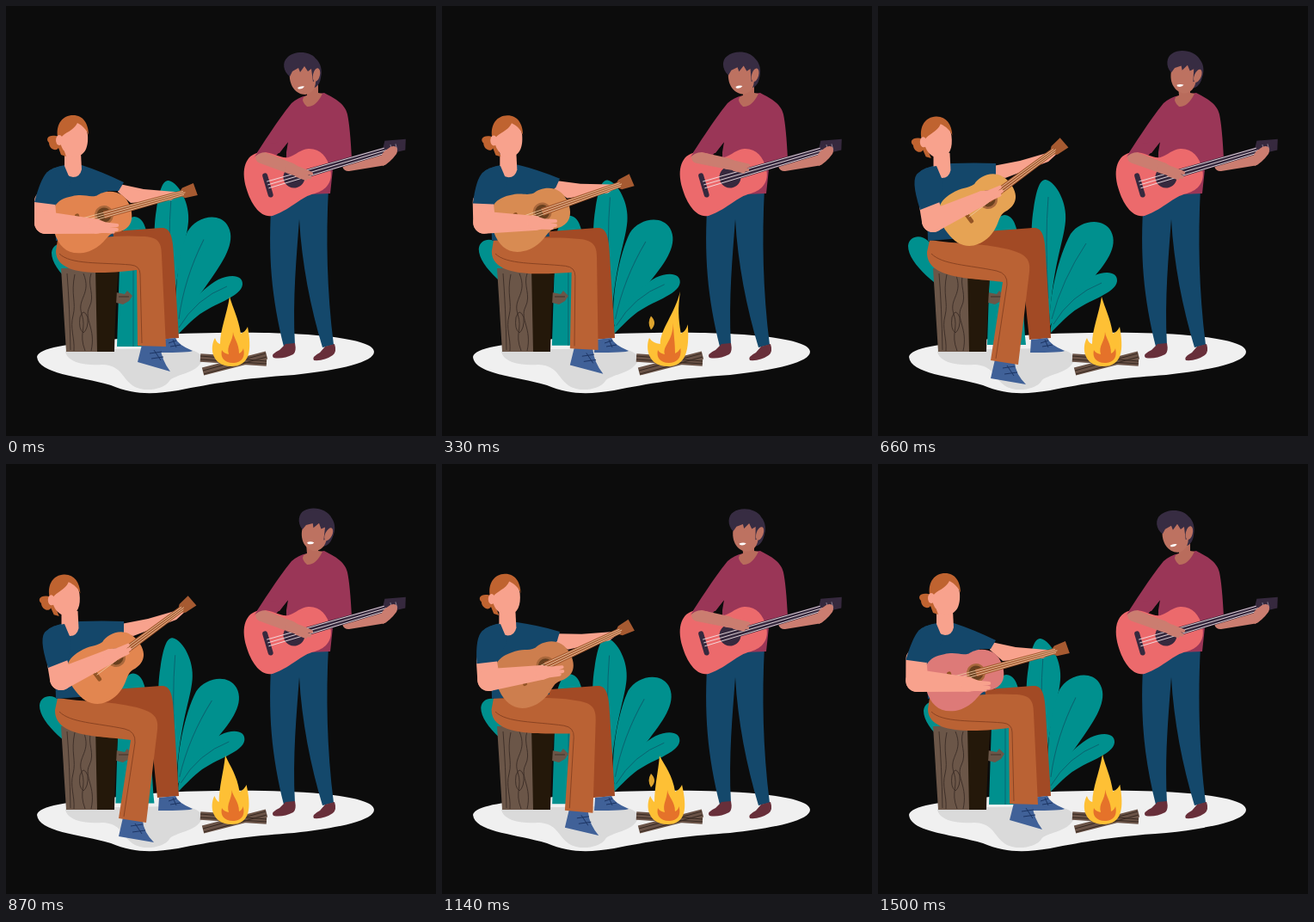
Write an HTML page that moves like this. It is 500 by 500 pixels and loops after 1530 ms.

```html
<!DOCTYPE html>
<html>
<head>
<meta charset="utf-8">
<title>Campfire duet</title>
<style>
html, body { margin: 0; height: 100%; overflow: hidden; background: #0c0c0c; }
svg { display: block; width: 100vw; height: 100vh; }
.vein { fill: none; stroke: #0a6470; stroke-width: 1; }
.grain { fill: none; stroke: #3f3029; stroke-width: 1; }
.seam { fill: none; stroke: #8a4322; stroke-width: 1; }
.skin { fill: #f8a28d; }
.tan { fill: #cb7d70; }
.shirt { fill: #14476a; }
.shoe { fill: #406198; }
.lace { fill: none; stroke: #1d3564; stroke-width: 1; }
.leaf { fill: #00908e; }
</style>
</head>
<body>
<svg viewBox="0 0 500 500">
  <path fill="#f0f0f0" d="M36 408C38 397 75 393 110 390C150 383 210 379 300 380C360 381 428 387 428 402C428 414 390 423 335 429C275 433 240 439 200 447C170 452 148 452 122 441C84 430 38 428 36 408Z"/>
  <path fill="#dadada" d="M69 402C72 415 92 418 112 417C136 418 134 434 150 443C162 449 184 446 190 436C196 428 222 428 228 412C229 402 214 398 198 398L70 400Z"/>

  <g id="leafA"><path class="leaf" d="M100 344C70 328 35 300 35 279C36 267 50 265 58 273C80 290 95 320 100 344Z"/></g>
  <g id="leafB"><path class="leaf" d="M127 394L130 300C129 265 136 244 147 243C168 245 164 285 172 394Z"/><path class="vein" d="M146 394V262"/></g>
  <g id="leafC"><path class="leaf" d="M199 375C180 310 175 270 181 235C184 215 188 201 195 202C208 205 220 230 218 250C216 275 203 300 199 375Z"/><path class="vein" d="M198 340Q194 270 198 222"/></g>
  <g id="leafD"><path class="leaf" d="M200 372C198 340 210 290 224 265C235 249 262 245 271 262C280 280 265 300 245 322C225 345 208 358 200 372Z"/><path class="vein" d="M202 364Q214 318 242 276"/></g>
  <g id="leafE"><path class="leaf" d="M201 380C198 358 230 325 250 314C265 307 279 309 278 320C276 335 245 341 225 357C215 365 208 373 201 380Z"/><path class="vein" d="M204 370Q224 336 260 322"/></g>

  <path fill="#6b5648" d="M128 333L138 335L141 331L147 337L143 343L136 347L128 345Z"/>
  <path fill="#6b5648" d="M64 305L70 402H107L105 304Z"/>
  <path fill="#24180a" d="M104 304L106 402H126Q127 350 131 304Z"/>
  <path class="grain" d="M71 311Q74 350 75 400M80 312C75 335 82 345 78 360S80 385 79 401M90 311C100 335 82 340 88 358S84 380 92 401M99 311C94 325 104 336 97 350S105 375 99 401M86 362Q90 350 95 362Q96 375 90 380Q84 376 86 362M131 338H143"/>

  <path fill="#a24a25" d="M100 264L180 258C190 257 194 265 195 290L201 386L176 388L166 290L100 292Z"/>
  <path class="shoe" d="M178 388L197 386Q200 394 217 401Q214 403 177 403Z"/>
  <path class="lace" d="M189 392L198 389M191 396L203 394M194 388L198 397"/>
  <path class="shoe" id="shoe"/><path class="lace" id="lace"/>
  <path fill="#ba6234" id="leg"/><path class="seam" id="seam"/>

  <path class="skin" id="farArm"/>
  <path class="shirt" id="torso"/>
  <path class="skin" id="neck" d="M68 165L87 170L88 190Q86 199 78 199Q69 198 68 190Z"/>
  <g id="head">
    <path fill="#bf6330" d="M62 152C50 148 45 154 50 159C50 166 58 170 61 165L64 173L70 175Z"/>
    <path class="skin" d="M63 150C61 165 71 176 81 175C92 174 96 164 95 150C94 140 88 134 82 134Z"/>
    <path fill="#bf6330" d="M60 152C58 137 66 127 78 127C90 127 96 137 96 150C94 144 89 139 83 136C79 145 68 147 64 153Z"/>
    <ellipse class="skin" cx="62" cy="156" rx="4" ry="6"/>
  </g>
  <g id="guitar">
    <path id="wood" d="M-61 3C-61 -25 -48 -33 -30 -31C-15 -30 -12 -24 -2 -24C8 -28 31 -25 32 0C32 22 18 25 6 23C-4 23 -8 34 -28 36C-50 37 -61 24 -61 3Z"/>
    <circle r="11" fill="#a9683c"/><circle r="8.5" fill="#69401f"/>
    <rect x="-33" y="-10" width="5" height="21" rx="2" fill="#945425"/>
    <path fill="#a65a31" d="M0 -4.5L93 -3.5L96 -6L110 -8L111 7L96 6L93 3.5L0 4.5Z"/>
    <path stroke="#efc6a0" stroke-width=".8" d="M-30 -3L96 -2M-30 0H98M-30 3L96 2"/>
  </g>
  <path class="skin" id="upper"/><path class="skin" id="fore"/><path class="skin" id="hand"/>
  <path class="shirt" id="sleeve"/>

  <path fill="#14486b" d="M309 222C304 290 309 340 323 396L336 394C333 340 338 290 341 248C344 300 354 350 368 397L381 394C373 330 372 270 375 212Z"/>
  <path fill="#682f3a" d="M325 393L336 392Q338 402 334 405Q322 411 311 409Q307 405 318 400Z"/>
  <path fill="#682f3a" d="M371 396L382 393Q385 402 380 406Q370 413 358 412Q355 408 365 403Z"/>
  <path fill="#9a3657" d="M350 104Q340 106 332 113C315 134 299 160 287 178L304 184L316 172L328 158L326 170V220L377 218L380 190L401 184L402 178C401 155 399 135 397 126C394 112 379 106 370 101Z"/>
  <path fill="#b96c5c" d="M349 92L363 90V101L368 102Q360 118 350 117Q343 111 346 106L350 104Z"/>
  <g id="head2">
    <path fill="#372c42" d="M352 70L366 74Q368 90 359 95L352 92Z"/>
    <path fill="#bd7261" d="M330 76C328 92 337 103 348 103C356 102 361 95 360 84L356 68L333 70Z"/>
    <path fill="#372c42" d="M330 82C322 76 321 65 327 60C335 52 353 52 360 61C366 66 368 75 366 82L357 88L355 73L351 76L347 70L342 77L340 72L333 76Z"/>
    <ellipse cx="361" cy="80" rx="4" ry="8" transform="rotate(12 361 80)" fill="#bd7261"/>
    <path fill="#fff" d="M339 95Q343 92.500 347 93.500Q345 97 340 96.500Z"/>
  </g>
  <path class="tan" id="fretArm"/>
  <g transform="translate(335 199) rotate(-16.3)">
    <path fill="#ec6a6c" d="M-57 -3C-57 -28 -46 -40 -32 -39C-17 -38 -10 -25 0 -24C10 -24 16 -29 25 -27C38 -24 44 -12 43 3C42 18 32 25 18 25C0 24 -10 34 -36 36C-50 36 -57 18 -57 -3Z"/>
    <circle r="12.5" fill="#36293e"/>
    <rect x="-35" y="-14" width="6" height="29" rx="3" fill="#36293e"/>
    <path fill="#36293e" d="M0 -5L109 -4L113 -11L137 -6L133 6L112 5L108 4L0 5Z"/>
    <path stroke="#f4e6ea" stroke-width=".8" d="M-32 -4L110 -3M-32 0H112M-32 4L110 3"/>
    <path stroke="#8b7f92" stroke-width="1" d="M118 -5V2M124 -4V3"/>
  </g>
  <path class="tan" d="M437 177Q436 170 444 166Q449 161 454 164Q456 168 454 172Q446 183 438 186Z"/>
  <path class="tan" id="fore2"/><path class="tan" id="hand2"/>
  <path fill="#9a3657" d="M300 160L287 178Q293 170 302 170L318 171L328 158Z"/>

  <g stroke="#6a5347" stroke-width="9.500">
    <path d="M226 409L303 414M229 425L303 406"/>
    <path stroke="#35271f" stroke-width="1" d="M226 407L303 413M226 411L303 416M229 424L302 404M230 428L303 408"/>
  </g>
  <path fill="#fec035" id="flame"/><path fill="#e5722a" id="core"/>
  <path fill="#dfa52e" id="spark" d="M0 -8Q8 0 0 8Q-5 0 0 -8Z"/>
</svg>
<script>
const LOOP = 1530, STEP = 30;
const KEYS = [0, 330, 660, 870, 1140, 1320, 1500, 1530];
const $ = id => document.getElementById(id);
const set = (id, d) => $(id).setAttribute('d', d);
const move = (id, v) => $(id).setAttribute('transform', v);
const mix = (a, b, k) => a + (b - a) * k;

// Smooth looping curve through one value per key, without overshoot.
function track(vals) {
  const v = [...vals, vals[0]], n = KEYS.length - 1;
  const slope = i => (v[i + 1] - v[i]) / (KEYS[i + 1] - KEYS[i]);
  const tan = i => {
    const a = slope((i + n - 1) % n), b = slope(i % n);
    return a * b <= 0 ? 0 : 2 * a * b / (a + b);
  };
  return t => {
    let i = 0;
    while (i < n - 1 && t >= KEYS[i + 1]) i++;
    const w = KEYS[i + 1] - KEYS[i], u = (t - KEYS[i]) / w, r = 1 - u;
    return v[i] * (1 + 2 * u) * r * r + v[i + 1] * u * u * (3 - 2 * u)
      + w * (tan(i) * u * r * r - tan(i + 1) * u * u * r);
  };
}

const lean = track([0, .19, 1, 1, .46, 0, 0]);
const elbow = track([0, .18, 1, 1, .46, .42, -.04]);
const tipX = track([130, 133, 144, 144, 141, 142, 130]);
const tipY = track([258, 253, 213, 213, 239, 237, 258]);
const sway = track([0, .57, 1, .78, .43, .18, 0]);
const nod = track([0, .22, .76, 1, .6, .3, .06]);
const strum = track([0, .55, .05, 0, .55, 1, .05]);
const flick = track([0, 17, 0, -5, -7, -2, 1]);
const red = track([226, 216, 230, 226, 205, 231, 221]);
const green = track([132, 139, 163, 134, 126, 134, 122]);
const blue = track([79, 82, 84, 80, 78, 80, 120]);

// Tapered limb with round ends.
function limb(ax, ay, aw, bx, by, bw) {
  const l = Math.hypot(bx - ax, by - ay) || 1, nx = (ay - by) / l, ny = (bx - ax) / l;
  return `M${ax - nx * aw} ${ay - ny * aw}L${bx - nx * bw} ${by - ny * bw}`
    + `A${bw} ${bw} 0 0 1 ${bx + nx * bw} ${by + ny * bw}`
    + `L${ax + nx * aw} ${ay + ny * aw}A${aw} ${aw} 0 0 1 ${ax - nx * aw} ${ay - ny * aw}Z`;
}

// Forearm and hand, ending at the fingertips.
function strumArm(fore, hand, ex, ey, ew, hx, hy, ww) {
  const l = Math.hypot(hx - ex, hy - ey), ux = (hx - ex) / l, uy = (hy - ey) / l;
  const at = (d, s) => [hx - ux * d - uy * s, hy - uy * d + ux * s];
  const [wx, wy] = at(25, 0);
  set(fore, limb(ex, ey, ew, wx, wy, ww));
  set(hand, limb(wx, wy, ww, ...at(10, 1), 5) + limb(...at(16, -2), 3.5, ...at(1, -3), 2)
    + limb(...at(14, 2), 3.5, ...at(1, 2), 2) + limb(...at(16, 4), 3, ...at(5, 5), 2));
}

function draw(t) {
  const p = lean(t), a = elbow(t), q = sway(t), r = 1 - q;
  const P = (x0, y0, x1, y1) => mix(x0, x1, p) + ' ' + mix(y0, y1, p) + ' ';

  move('leafA', `translate(${18 * r} ${8 * r})`);
  move('leafB', `translate(${2 * r} ${2 * r})`);
  move('leafC', `translate(${-6 * r} ${r})`);
  move('leafD', `rotate(${-7 * r} 200 372)`);
  move('leafE', `translate(${-3 * r} ${4 * r})`);

  set('leg', `M60 272C${P(100, 270, 90, 277)}${P(130, 266, 118, 275)}${P(158, 268, 152, 283)}`
    + `C${P(176, 268, 170, 288)}${P(181, 274, 178, 293)}${P(181, 290, 176, 309)}`
    + `L${P(186, 396, 163, 417)}L${P(153, 395, 131, 412)}L${P(152, 307, 145, 321)}`
    + `C${P(125, 310, 112, 316)}${P(58, 318, 56, 319)}${P(58, 285, 57, 286)}Z`);
  set('seam', `M62 288C75 301 ${P(110, 298, 105, 301)}${P(145, 301, 138, 308)}`
    + `Q${P(156, 302, 151, 311)}${P(156, 312, 150, 324)}L${P(158, 392, 137, 410)}`);
  set('shoe', `M${P(158, 394, 136, 411)}L${P(153, 414, 131, 433)}L${P(191, 425, 172, 440)}`
    + `Q${P(181, 412, 160, 428)}${P(179, 395, 159, 415)}Z`);
  set('lace', `M${P(167, 404, 145, 421)}L${P(181, 402, 159, 419)}M${P(169, 410, 147, 428)}`
    + `L${P(183, 408, 162, 426)}M${P(172, 400, 150, 418)}L${P(180, 412, 158, 430)}`);

  set('farArm', `M${P(132, 207, 134, 186)}L${P(160, 213, 165, 180)}L${P(196, 216, 196, 171)}`
    + `L${P(204, 218, 209, 171)}L${P(192, 226, 198, 181)}L${P(145, 229, 148, 200)}L${P(130, 216, 132, 197)}Z`);
  set('torso', `M69 185Q55 187 ${P(47, 194, 45, 196)}L57 235L58 273L125 268L118 215`
    + `L${P(131, 215, 137, 196)}L${P(137, 205, 137, 183)}Q${P(110, 192, 112, 182)}${P(88, 185, 86, 183)}Z`);
  move('neck', `translate(${-3.5 * p} ${p})`);
  move('head', `translate(${-8.5 * p} ${1.5 * p}) rotate(${-3 * p} 78 170)`);

  move('guitar', `translate(${P(114, 243, 128, 225)}) rotate(${mix(-15.5, -36.5, p)})`);
  $('wood').setAttribute('fill', `rgb(${red(t) | 0},${green(t) | 0},${blue(t) | 0})`);

  const ex = mix(46, 64, a), ey = mix(252, 250, a), hx = mix(45, 60, a), hy = mix(227, 232, a);
  set('upper', limb(hx, hy, 12, ex, ey, 13));
  strumArm('fore', 'hand', ex, ey, 13, tipX(t), tipY(t), 8.5);
  set('sleeve', `M68 186Q54 187 47 194Q${mix(40, 37, a)} ${mix(202, 200, a)} ${mix(33, 49, a)} ${mix(228, 237, a)}`
    + `L${mix(57, 72, a)} ${mix(231, 228, a)}L76 205Z`);

  const n = nod(t), v = strum(t);
  move('head2', `translate(${8 * n} 0) rotate(${14 * n} 357 106)`);
  strumArm('fore2', 'hand2', 297, 176, 7, 355 + 3 * v, 198 - 17 * v, 6.5);

  const f = flick(t), k = Math.abs(f) / 17;
  const s = f * .28, up = f > 0 ? -6 * k : 3 * k;
  set('flame', `M${260 + f} ${338 + up}C${264 + f * .6} 352 ${270 + s} 362 ${273 + s} 381`
    + `Q${279 + s} 378 ${281 + s} ${373 - Math.max(0, s) * .6}C${286 + s * .4} 400 284 419 262 419`
    + `C240 419 236 398 ${243 - k * 2} 386Q245 392 ${249 + s} 393C${249 + s} 376 ${257 + f * .8} 358 ${260 + f} ${338 + up}Z`);
  const top = `${264 + s} ${379 - Math.max(0, f) * .6}`;
  set('core', `M${top}C${265 + s} 387 271 392 271 404Q275 402 ${276 + s * .3} 398`
    + `C279 410 272 415 264 415C253 415 249 408 251 400Q253 404 259 405C256 395 ${264 + s} 390 ${top}Z`);

  const d = [335, 1140].map(c => (t - c) / 130).find(x => Math.abs(x) < 1);
  const size = d === undefined ? 0 : Math.sqrt(1 - d * d);
  move('spark', `translate(243 ${368 - 14 * (d || 0)}) scale(${size})`);
}

set('fretArm', limb(398, 185, 7, 438, 179, 6.5));
const start = performance.now();
function tick(now) {
  const t = Math.max(0, now - start) % LOOP;
  draw(Math.floor(t / STEP) * STEP);
  requestAnimationFrame(tick);
}
draw(0);
requestAnimationFrame(tick);
</script>
</body>
</html>
```
